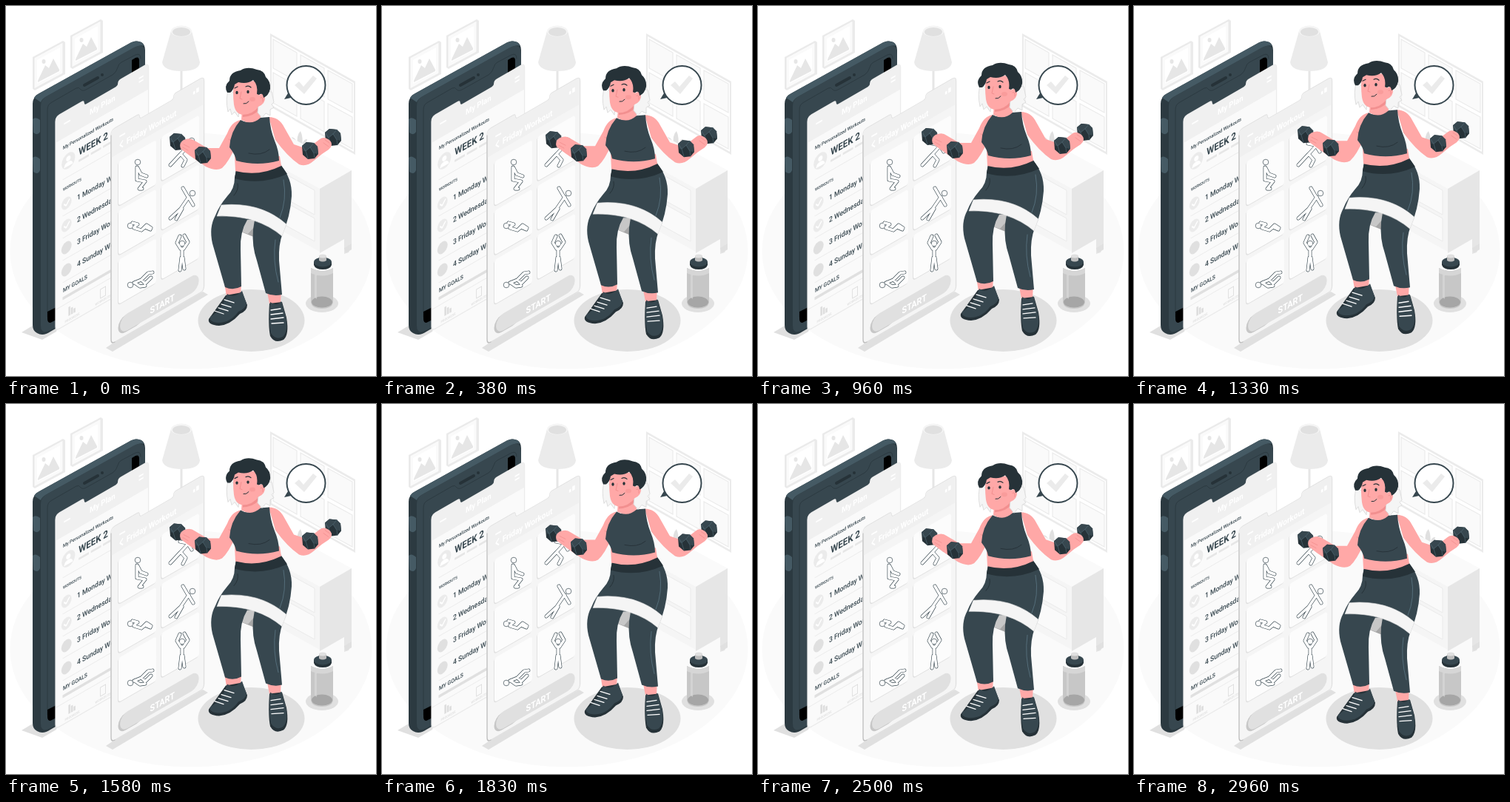
Write an HTML page that moves like this. It is 500x500 px and loops after 3 s.

```html
<!DOCTYPE html>
<html lang="en">
<head>
<meta charset="utf-8">
<title>Home workout</title>
<style>
  html, body { margin: 0; width: 100%; height: 100%; overflow: hidden; background: #fff; }
  svg { display: block; width: 100vw; height: 100vh; }
  text { font-family: Roboto, Inter, sans-serif; font-weight: 500; fill: #37474f; }
  .bold { font-weight: 700; }
  .white { fill: #fff; }
  .pale { fill: #f5f5f5; }
  .soft { fill: #ebebeb; }
  .grey { fill: #e0e0e0; }
  .dark { fill: #37474f; }
  .deep { fill: #263238; }
  .skin { fill: #ffa8a7; }
  .line { fill: none; stroke-linecap: round; stroke-linejoin: round; }
</style>
</head>
<body>
<svg viewBox="0 0 500 500">
  <defs>
    <g id="picture">
      <path class="soft" d="M0 22 41 0 44 2V45L3 67 0 65Z"/>
      <path fill="#fafafa" stroke="#e6e6e6" stroke-width=".8" d="M2 23 41 2V44L2 65Z"/>
      <path fill="#fff" d="M6 26 37 9V42L6 58Z"/>
      <path fill="#e6e6e6" d="M7 54 17 33 22 37 28 24 36 39V41L7 56Z"/>
      <ellipse fill="#e6e6e6" cx="15" cy="28" rx="2.500" ry="3"/>
    </g>
    <g id="head">
      <path class="deep" d="M-10-6-4-11 6-10 11-5 12 5 7 11-2 12-9 6Z"/>
      <path class="dark" d="M-10-6-4-11 6-10 1-4-5 1-8 1ZM1-4 6-10 11-5 12 5 6 4Z"/>
      <path class="line" stroke="#546e7a" stroke-width=".6" d="M-9-5-5 1-2 11M-5 1 1-4 6-10M1-4 6 4 7 11"/>
    </g>
    <path id="notched" d="M0 6Q0 0 6 0H40Q44 0 44 3 44 7 48 7H94Q98 7 98 3 98 0 102 0H139Q145 0 145 6V283Q145 289 139 289H6Q0 289 0 283Z"/>
    <clipPath id="screen"><use href="#notched"/></clipPath>
  </defs>

  <ellipse cx="250" cy="331" rx="244.500" ry="159.500" fill="#fafafa"/>

  <g id="room">
    <use href="#picture" x="36" y="47"/>
    <use href="#picture" x="87" y="18"/>

    <path d="M237 70V150" stroke="#e6e6e6" stroke-width="3"/>
    <path class="soft" d="M223 34 211 76Q213 88 237 88T262 76L251 34Z"/>
    <ellipse class="pale" cx="237" cy="34" rx="14" ry="7.500"/>
    <ellipse class="grey" cx="237" cy="35" rx="12" ry="6"/>

    <path class="soft" d="M357 37 472 102V201L357 136Z"/>
    <path fill="#fff" d="M359 41 470 104V197L359 134Z"/>
    <path fill="#fafafa" stroke="#ebebeb" stroke-width="1.200"
      d="M361 45 393 63V102L361 84ZM398 66 430 84V123L398 105ZM435 87 468 105V144L435 126ZM361 90 393 108V149L361 131ZM398 111 430 129V170L398 152ZM435 132 468 150V193L435 175Z"/>

    <path class="grey" d="M386 177Q393 178 394 190 392 174 398 169 402 178 400 189 402 179 407 180 405 190 402 198H390Q391 187 386 177Z"/>
    <path fill="#fafafa" d="M325 192 367 168 467 222 424 247Z"/>
    <path class="pale" d="M325 192 424 247V332L325 277Z"/>
    <path fill="#e6e6e6" d="M424 247 467 222V325L463 333 457 335V315L424 334Z"/>
    <path fill="#fafafa" stroke="#ebebeb" d="M330 201 417 249V282L330 234ZM330 239 417 287V318L330 270Z"/>
    <path class="grey" d="M457 327 467 321V329L459 334Z"/>
  </g>

  <g id="bubble">
    <path class="dark" d="M384 113 376 126 390 123Z"/>
    <circle cx="405.500" cy="107" r="26" fill="#fff" stroke="#37474f" stroke-width="2"/>
    <path class="soft" d="M390 107 396 102 402 109 415 94 420 98 403 119Z"/>
  </g>

  <g id="phone">
    <path class="grey" d="M21 441 36 432 70 434 68 440 49 451Z"/>
    <path fill="#2c3a41" d="M36 132Q36 123 45 118L166 51Q175 45 183 49 188 52 188 60V366L60 440Q50 447 42 442 36 439 36 431Z"/>
    <path fill="#455a64" d="M38 124Q40 120 45 118L166 51Q175 45 183 49L187 54Q181 52 174 56L55 122Q49 125 47 130Z"/>
    <path class="dark" d="M47 135Q47 126 55 122L173 56Q188 49 188 65V366L60 438Q47 445 47 432Z"/>
    <path class="line" stroke="#2c3a41" stroke-width="1" d="M56 420V140Q56 133 62 130L95 111Q99 109 101 113 104 116 110 112L144 93Q149 90 151 83 152 78 156 76L175 66Q182 63 182 71"/>
    <path d="M170 73 175 70Q180 68 180 74V95H170ZM56 413 68 407V424L60 428Q56 428 56 423Z"/>
    <path class="line" stroke="#263238" stroke-width="4" d="M106 107 124 97"/>
    <circle class="deep" cx="130" cy="93" r="2"/>
    <path fill="#455a64" d="M36 153Q40 149 46 154V170Q43 176 37 171ZM36 205Q40 201 46 207V222Q43 229 37 224Z"/>
  </g>

  <g id="plan" transform="matrix(.866 -.5 0 1 67 150)">
    <use href="#notched" fill="#fafafa" stroke="#ebebeb" stroke-width="1.500"/>
    <path clip-path="url(#screen)" fill="#f0f0f0" d="M0 0H145V35H0Z"/>
    <path class="white" d="M13 15H23V17H13ZM130 12H137V14H130ZM130 17H137V19H130Z"/>
    <text class="white bold" x="53" y="24" font-size="11">My Plan</text>
    <text x="11.500" y="50" font-size="6.600">My Personalized Workouts</text>
    <circle class="soft" cx="20" cy="69" r="10.500"/>
    <circle class="white" cx="20" cy="66" r="3.500"/>
    <path class="white" d="M13 76Q14 70 20 70T27 76Z"/>
    <text class="bold" x="36" y="70" font-size="13.300">WEEK 2</text>
    <path fill="#e6e6e6" d="M36 76H52V79H36ZM55 76H71V79H55ZM74 76H90V79H74Z"/>
    <path class="soft" d="M11 90H134V91H11Z"/>
    <text x="11.500" y="106" font-size="5.400">WORKOUTS</text>
    <g id="days"></g>
    <text x="11.500" y="243" font-size="7.800">MY GOALS</text>
    <path class="grey" d="M11 249H134V253H11Z"/>
    <path class="soft" d="M0 260H145V261H0Z"/>
    <path fill="#ddd" d="M20 267H23V279H20ZM24 270H27V279H24ZM28 273H31V279H28Z"/>
    <path fill="none" stroke="#ddd" d="M70 268H78V280H70Z"/>
    <text x="26" y="286" font-size="4.600" text-anchor="middle" style="fill:#ddd">PROGRESS</text>
    <text x="74" y="286" font-size="4.600" text-anchor="middle" style="fill:#ddd">WORKOUTS</text>
  </g>

  <path class="grey" d="M135 462 144 456 266 386 273 390 144 467Z"/>
  <g id="workout" transform="matrix(.866 -.5 0 1 142 168)">
    <use href="#notched" fill="#f5f5f5" stroke="#e0e0e0" stroke-width="1.500"/>
    <path clip-path="url(#screen)" fill="#f0f0f0" d="M0 0H145V37H0Z"/>
    <path class="line" stroke="#bdbdbd" stroke-width="1.200" d="M0 7V282Q0 289 6 289"/>
    <path class="line" stroke="#fff" stroke-width="1.800" d="M18 23 14 27 18 31"/>
    <path class="white" d="M13 14H22V16H13ZM128 12H131V16H128ZM133 10H137V16H133Z"/>
    <text class="white bold" x="24" y="31" font-size="11.500">Friday Workout</text>
    <g id="cards"></g>
    <rect fill="#c7c7c7" x="11" y="261" width="40" height="23" rx="11.500"/>
    <rect fill="#e0e0e0" x="14" y="260" width="123" height="23" rx="11.500"/>
    <text class="white bold" x="80" y="279" font-size="12.500" text-anchor="middle">START</text>
  </g>
  <g id="poses"></g>

  <ellipse class="grey" cx="331.500" cy="425" rx="72" ry="42"/>
  <g id="bottle">
    <ellipse class="grey" cx="427" cy="402" rx="22" ry="12"/>
    <path fill="#c7c7c7" d="M412 354Q428 362 442 354V401Q440 409 427 409T412 401Z"/>
    <path fill="#d6d6d6" d="M412 354Q428 362 442 354V361Q428 368 412 361Z"/>
    <ellipse fill="#a6a6a6" cx="427" cy="400" rx="14" ry="7.500"/>
    <path fill="#e0e0e0" opacity=".5" d="M417 363H420V396L417 394Z"/>
    <path class="deep" d="M416 346H440V350Q438 356 428 356T416 350Z"/>
    <ellipse class="dark" cx="428" cy="346" rx="12" ry="6.500"/>
    <path fill="#bdbdbd" d="M423 338Q428 334 433 338V344Q428 347 423 344Z"/>
    <ellipse class="grey" cx="428" cy="338" rx="5" ry="2.500"/>
  </g>

  <g id="woman">
    <g id="legs">
      <path class="skin" d="M295 374H318L317 392Q307 399 298 392ZM352 382H372L371 402Q363 408 356 402Z"/>
      <path class="deep" d="M297 391 319 387 326 404Q326 412 316 416 303 431 288 432 272 431 274 423Z"/>
      <path class="dark" d="M299 389Q308 396 319 385L325 402Q324 409 314 413 303 428 287 428 274 427 276 420 292 411 299 389Z"/>
      <path class="deep" d="M356 402 373 400 379 421Q383 444 375 451 363 457 357 446 354 432 356 402Z"/>
      <path class="dark" d="M357 400Q365 407 372 399L378 419Q382 439 374 447 364 452 358 442 354 425 357 400Z"/>
      <path class="line" stroke="#fff" stroke-width="1.300" d="M295 397 308 401M291 403 304 407M287 408 300 412M282 412 294 416M358 411 371 409M358 417 374 415M358 423 375 421M359 429 375 428"/>
      <path fill="#a6a6a6" d="M316 288 338 288 337 313 315 304Z"/>
      <path fill="#c7c7c7" d="M316 286 338 286 335 299 327 308 315 304Z"/>
      <path class="dark" d="M311 222 371 215Q387 233 386 257 384 285 374 307 368 322 369 344L373 390Q362 393 351 388L339 344Q332 324 334 302L336 289 326 289Q316 305 317 329L318 379Q307 385 296 380L279 321Q274 299 283 283 288 270 299 257 309 247 309 232Z"/>
      <path class="deep" d="M311 221Q344 229 371 214L380 227Q345 243 309 233Z"/>
      <path class="line" stroke="#607d8b" stroke-width=".7" d="M375 235Q380 262 370 286M364 316Q360 344 368 373"/>
      <path class="line" stroke="#263238" d="M313 240Q315 248 308 256M336 289Q342 280 351 277"/>
      <path fill="#f5f5f5" stroke="#e0e0e0" stroke-width=".6" d="M291 269Q344 264 379 295L373 311Q339 282 285 284Z"/>
    </g>

    <g id="torso">
      <use href="#head" x="231" y="183"/>
      <use href="#head" x="441" y="177"/>
      <path class="skin" d="M317 154Q305 156 299 172L288 192 272 192 255 182Q249 177 240 181 233 185 236 193L248 202 270 217Q284 224 292 219 301 211 311 188Z"/>
      <path class="skin" d="M355 150Q369 150 376 164L389 187 407 193 424 180Q430 175 438 182 443 188 436 194L427 200 416 209Q406 218 396 214 380 203 364 181Z"/>
      <path class="line" stroke="#f28f8f" stroke-width=".8" d="M240 187 248 191M239 191 246 195M431 181 437 185M429 185 436 190M301 180 306 183"/>
      <path class="skin" d="M309 203H370L372 216Q342 231 310 223Z"/>
      <path class="dark" d="M317 154Q328 161 343 151L356 150Q357 167 363 182 369 196 369 209 340 217 311 209 310 201 302 191 303 170 317 154Z"/>
      <path class="skin" d="M319 139 342 132 344 151Q332 162 318 154Z"/>
      <path fill="#f28f8f" d="M320 145Q334 145 342 136V140Q335 149 320 150Z"/>
      <path class="line" stroke="#263238" stroke-width=".9" d="M328 199Q345 203 356 194"/>
      <use href="#head" x="265" y="201"/>
      <use href="#head" x="410" y="195"/>
    </g>

    <g id="face">
      <path fill="#f5f5f5" stroke="#d6d6d6" stroke-width=".8" d="M301 112Q296 125 300 143L303 139 305 147 309 143 314 150 317 126ZM343 114 359 116 362 130 359 133 362 137 357 140 357 148 351 145 346 151 340 144Z"/>
      <path class="skin" d="M308 102Q306 116 308 133 310 146 320 147 333 147 341 136 351 132 350 122 347 116 342 121L341 101Z"/>
      <path class="deep" d="M299 117Q294 108 302 101 302 89 317 87 326 81 339 86 349 87 351 96 358 102 357 112 355 121 348 124 347 116 342 120L339 119Q341 107 334 100 326 106 314 103L309 106Q308 113 303 117Z"/>
      <ellipse class="deep" cx="312" cy="117" rx="1.700" ry="2.200"/>
      <ellipse class="deep" cx="327" cy="116" rx="1.700" ry="2.200"/>
      <path class="line" stroke="#263238" stroke-width="1.200" d="M309 111 313 109M324 109Q328 107 331 110"/>
      <path class="line" stroke="#f28f8f" d="M318 116 316 125 319 126M344 124Q348 122 347 129"/>
      <path class="line" stroke="#263238" d="M321 132Q325 133 328 129"/>
      <ellipse cx="333" cy="126" rx="4" ry="3" fill="#f28f8f" opacity=".45"/>
    </g>
  </g>
</svg>
<script>
const byId = id => document.getElementById(id);

const days = ["Monday", "Wednesday", "Friday", "Sunday"];
byId("days").innerHTML = days.map((day, i) => {
  const y = 125 + 30 * i;
  const check = i < 2
    ? `<path class="line" stroke="#fff" stroke-width="1.800" d="M13.500 ${y}l3 3 5-6"/>` : "";
  return `<circle class="${i < 2 ? "soft" : "grey"}" cx="17" cy="${y}" r="8"/>${check}
    <text x="33.500" y="${y + 4.5}" font-size="9.900">${i + 1} ${day} Workout</text>
    <path class="soft" d="M11 ${y + 14}H134v1H11Z"/>`;
}).join("");

byId("cards").innerHTML = [48, 114.5, 181].map(y => [11.5, 78.5].map(x =>
  `<rect fill="#e0e0e0" x="${x - 1}" y="${y + 1}" width="59" height="60" rx="4"/>
   <rect fill="#fcfcfc" x="${x}" y="${y}" width="59" height="60" rx="4"/>`).join("")).join("");

// Each pose: head centre, then limb path.
const poses = [
  [178, 211, "M177 218V234M178 219 182 227 190 230M177 235 188 237 180 247 184 247"],
  [251, 182, "M247 188 236 200M246 189 251 197M236 200 243 208 239 216M236 200 222 215M245 188 235 186"],
  [168, 297, "M173 300 183 303 190 296 196 300M183 303 188 299 195 302M173 299 178 295 171 293"],
  [252, 253, "M247 258 236 274 222 287M238 274 230 288M247 259 253 269M246 258 239 246"],
  [168, 377, "M173 374 183 370 192 361 198 360M183 370 188 375 196 367M174 374 181 379 188 378"],
  [238, 321, "M238 328V340M236 328 231 320 235 311M240 328 246 319 241 310M237 340 235 357M239 340 241 355"]
];
byId("poses").innerHTML = poses.map(([x, y, limbs]) => `
  <path class="line" stroke="#37474f" stroke-width="4.800" d="${limbs}"/>
  <circle cx="${x}" cy="${y}" r="3.800" fill="#fff" stroke="#37474f" stroke-width=".7"/>
  <path class="line" stroke="#fff" stroke-width="3.500" d="${limbs}"/>`).join("");

const LOOP = 3000, RISE = 11;
const woman = byId("woman");

function draw(time) {
  const phase = (time % LOOP) / LOOP;
  const lift = RISE * (1 - Math.abs(1 - 2 * phase));
  woman.setAttribute("transform", `translate(0 ${-lift})`);
}

const start = performance.now();
function tick() {
  draw(performance.now() - start);
  requestAnimationFrame(tick);
}
tick();
</script>
</body>
</html>
```
